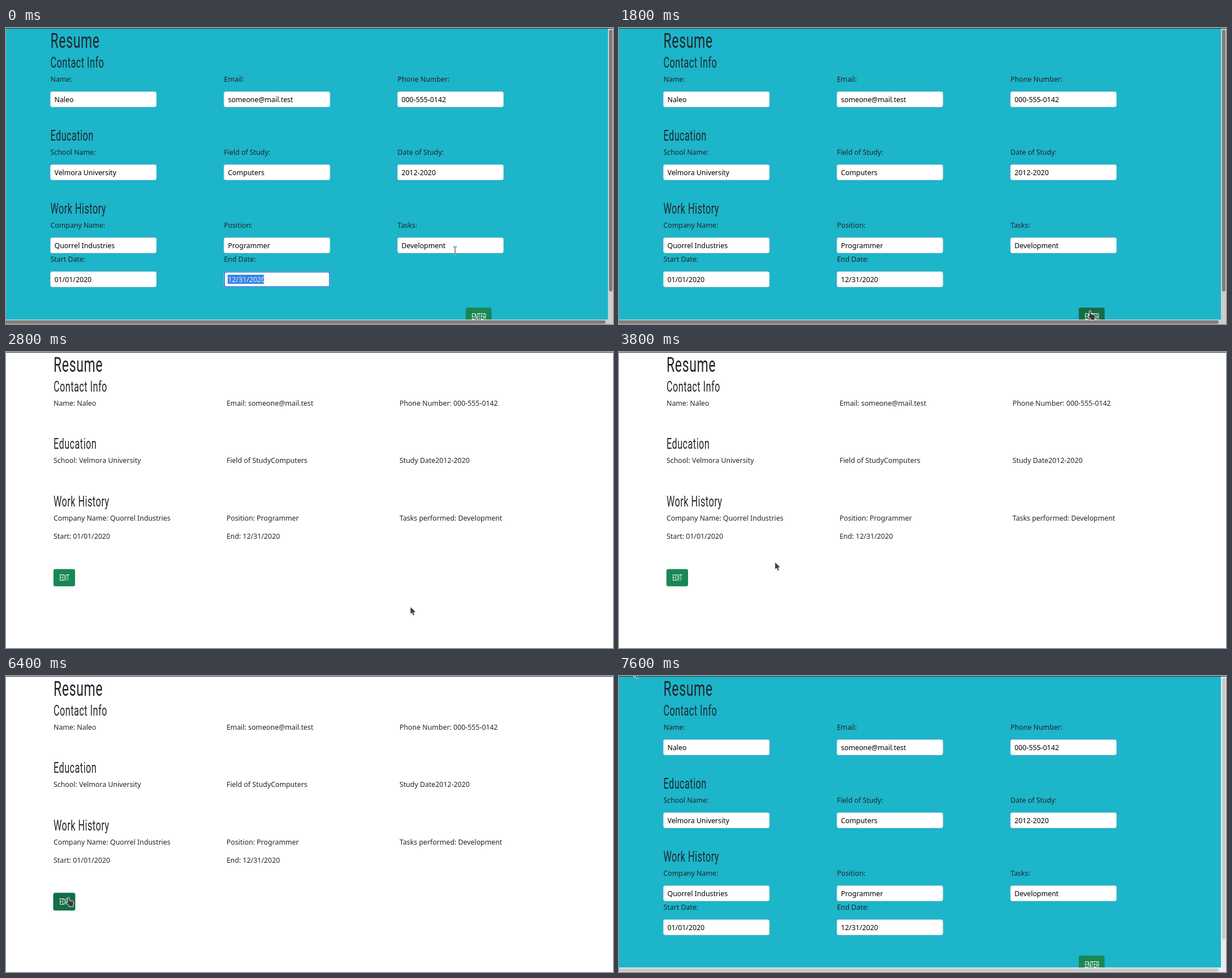
Write an HTML page that moves like this. It is 1072 by 523 pixels and loops after 8 s.

```html
<!DOCTYPE html>
<html lang="en">
<head>
<meta charset="utf-8">
<title>Resume form</title>
<style>
html, body { margin: 0; width: 100%; height: 100%; overflow: hidden; background: #fff; }
svg { display: block; width: 1072px; height: 523px; }
text { font: 12.35px "Noto Sans", "Open Sans", sans-serif; fill: #212529; white-space: pre; }
.value { fill: #000; }
.h1, .h3, .btn { font-family: Roboto, sans-serif; letter-spacing: .03em; }
.h1 { font-size: 37.5px; }
.h3 { font-size: 26.5px; }
.btn { font-size: 14.5px; letter-spacing: -.04em; fill: #fff; }
.face { fill: #198754; }
.pressed { fill: #156d45; }
.ring { fill: #9fd0b8; }
.field { fill: #fff; stroke: #ced4da; }
#focus .field { stroke: #2a76d6; stroke-width: 1.6; }
#focus .mark { fill: #3584e4; }
#focus .value { fill: #e3eefb; }
.track { fill: #cdcdcd; }
.thumb { fill: #7d7d7d; }
.idle .track { fill: #ececec; }
.idle .thumb { fill: #c9c9c9; }
.pointer { fill: #3b3b3b; stroke: #fff; stroke-width: .9; stroke-linejoin: round; }
.beam { fill: none; stroke: #222; }
.halo { fill: none; stroke: #fff; stroke-width: 2.4; opacity: .75; }
</style>
</head>
<body>
<svg viewBox="0 0 1072 523">
  <defs><path id="beam" d="M-3-6.5H-1L0-5.5L1-6.5H3M0-5.5V5.5M-3 6.5H-1L0 5.5L1 6.5H3"/></defs>
  <g id="form"></g>
  <g id="view"></g>
  <rect width="1072" height="1" fill="#23282b"/>
  <g id="cursor">
    <path class="pointer" d="M0 0V13.5L3 10.8L5 15.8L7.6 14.7L5.8 10.2L10 9.6Z"/>
    <path class="pointer" d="M-1.6 1Q-1.6-.6 0-.6T1.6 1V5.2L7.6 6.4Q9.4 7 9.2 9L8.3 13V16H.6V14L-4 9.6Q-4.2 7.6-2.6 8L-1.6 8.8Z"/>
    <g><use href="#beam" class="halo"/><use href="#beam" class="beam"/></g>
  </g>
</svg>
<script>
const $ = id => document.getElementById(id);
const text = (x, y, s, cls = '') => `<text class="${cls}" x="${x}" y="${y}">${s}</text>`;
// Headings and buttons share one condensed display style.
const display = (x, y, s, cls) =>
  `<text class="${cls}" transform="translate(${x} ${y}) scale(.612 1)">${s}</text>`;
const rect = (x, y, w, h, cls, r = 0) =>
  `<rect class="${cls}" x="${x}" y="${y}" width="${w}" height="${h}" rx="${r}"/>`;
const box = (x, y, w, h) => ({ x, y, w, h });
const inside = (x, y, b) => x >= b.x && x <= b.x + b.w && y >= b.y && y <= b.y + b.h;
const show = (el, on) => el.style.display = on ? '' : 'none';

// Each cell: form label, label on the finished page, value
const sections = [
  ['Contact Info', [
    ['Name:', 'Name: ', 'Naleo'],
    ['Email:', 'Email: ', 'someone@mail.test'],
    ['Phone Number:', 'Phone Number: ', '000-555-0142']]],
  ['Education', [
    ['School Name:', 'School: ', 'Velmora University'],
    ['Field of Study:', 'Field of Study', 'Computers'],
    ['Date of Study:', 'Study Date', '2012-2020']]],
  ['Work History', [
    ['Company Name:', 'Company Name: ', 'Quorrel Industries'],
    ['Position:', 'Position: ', 'Programmer'],
    ['Tasks:', 'Tasks performed: ', 'Development']], [
    ['Start Date:', 'Start: ', '01/01/2020'],
    ['End Date:', 'End: ', '12/31/2020']]]
];

// Lays out headings and cells on a regular grid.
function page(left, colGap, sectionGap, rowGap, cell) {
  let out = display(left, 35, 'Resume', 'h1');
  sections.forEach(([title, ...rows], s) => {
    const top = s * sectionGap;
    out += display(left, 69.5 + top, title, 'h3');
    rows.forEach((cells, r) => cells.forEach((c, i) =>
      out += cell(left + i * colGap, 94.5 + top + r * rowGap, ...c)));
  });
  return out;
}
const button = ({ x, y, w, h }, label) =>
  rect(x - 1, y - 1, w + 2, h + 2, 'ring', 4) + rect(x, y, w, h, 'face', 3.5) +
  rect(x, y, w, h, 'pressed', 3.5) + display(x + 10.5, y + 21, label, 'btn');

const enter = box(812, 494, 45.5, 30.5), edit = box(83.8, 383.4, 38.2, 30.6);
const inputs = [];
function field(x, y, label, _, value) {
  const b = box(x, y + 18, 187, 27);
  inputs.push(b);
  return text(x, y, label) + rect(b.x, b.y, b.w, b.h, 'field', 3) + text(x + 7, y + 36, value, 'value');
}
const fields = page(78.5, 306.5, 129, 60, field);
const last = inputs.at(-1);
$('form').innerHTML = '<rect width="1072" height="523" fill="#1cb5ca"/>' + fields +
  `<g id="focus">${rect(last.x + .8, last.y + .7, last.w - 1.4, last.h - 1.2, 'field', 2.5)}
    ${rect(last.x + 6.5, last.y + 5.5, 64, 16, 'mark')}
    ${text(last.x + 7, last.y + 18, '12/31/2020', 'value')}</g>` +
  button(enter, 'ENTER') +
  rect(0, 515, 1072, 8, 'track') + rect(1063, 1, 9, 522, 'track') +
  rect(-4, 516.5, 1063, 6, 'thumb', 3) + rect(1065, 3, 6, 462.5, 'thumb', 3);

$('view').innerHTML = '<rect width="1072" height="523" fill="#fff"/>' +
  page(84, 305.5, 101.5, 32, (x, y, _, label, value) => text(x, y, label + value)) +
  button(edit, 'EDIT');

// Pointer moves: start and end in seconds, then where it comes to rest
const home = [793, 393];
const moves = [
  [0, .1, 751, 402], [.5, .6, 744, 450], [1, 1.7, 832, 500],
  [2.4, 2.8, 714, 450], [2.9, 3, 474, 352], [3.4, 3.9, 265, 372],
  [3.9, 4.3, 604, 385], [4.5, 4.9, 73, 357], [5, 5.4, 90, 316],
  [5.4, 5.9, 117, 382], [5.9, 6, 110.5, 391.5], [6.7, 7, 80, 143], [7.3, 7.6, 26, -11]
];
function pointer(t) {
  let [x, y] = home;
  for (const [from, to, tx, ty] of moves) {
    const k = Math.min(1, Math.max(0, (t - from) / (to - from)));
    const ease = Math.sin(k * Math.PI / 2);
    x += (tx - x) * ease;
    y += (ty - y) * ease;
  }
  return [x, y];
}

function draw(t) {
  const viewing = t >= 1.9 && t < 6.5;
  const [x, y] = pointer(t);
  const onButton = inside(x, y, viewing ? edit : enter);
  const onInput = !viewing && inputs.some(b => inside(x, y, b));

  show($('view'), viewing);
  show($('form'), !viewing);
  show($('focus'), t < .6);
  $('form').classList.toggle('idle', t >= 7.6);
  for (const el of document.querySelectorAll('.pressed')) show(el, onButton);
  for (const el of document.querySelectorAll('.ring')) show(el, viewing && t >= 6.4);

  $('cursor').setAttribute('transform', `translate(${x} ${y})`);
  const [arrow, hand, beam] = $('cursor').children;
  show(arrow, !onButton && !onInput);
  show(hand, onButton);
  show(beam, onInput);
}

// The picture advances ten times a second.
const start = performance.now();
function tick() {
  draw(Math.floor((performance.now() - start) % 8000 / 100) / 10);
  requestAnimationFrame(tick);
}
tick();
</script>
</body>
</html>
```
